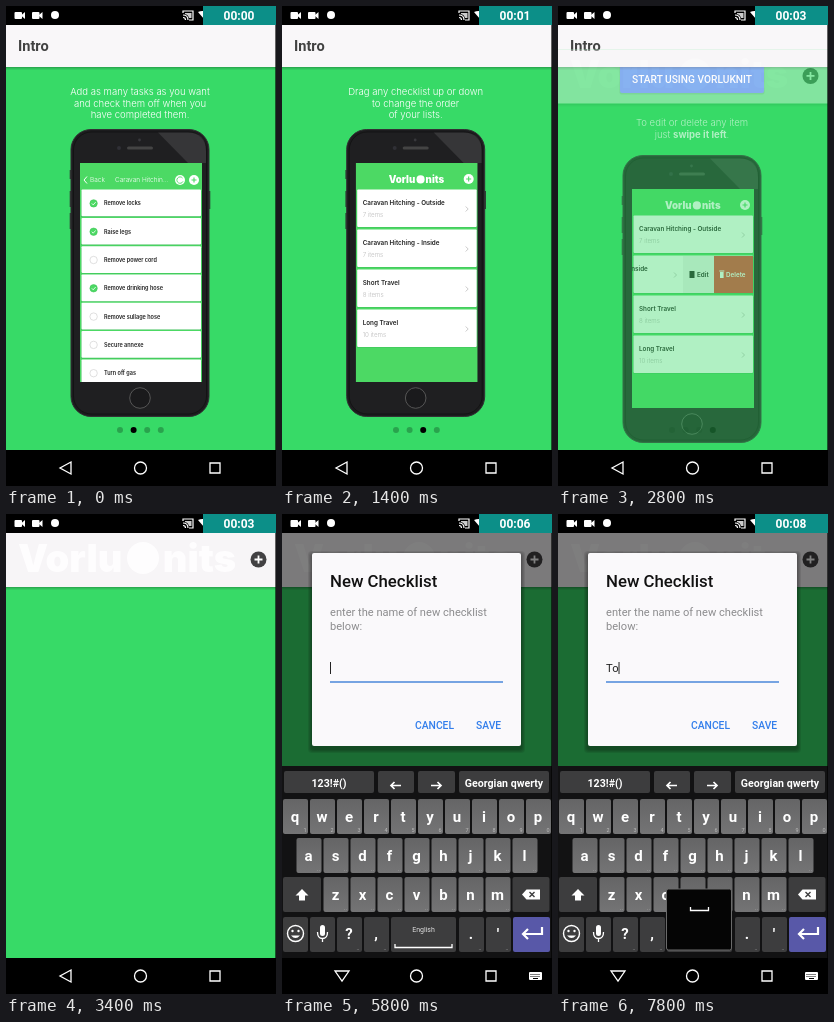
An HTML page that plays this animation: 270x480 px, repeating every 8 s.

```html
<!DOCTYPE html>
<html lang="en">
<head>
<meta charset="utf-8">
<title>Checklist app intro</title>
<style>
html, body { margin: 0; width: 100%; height: 100%; overflow: hidden; background: #000; }
svg { display: block; width: 100%; height: 100%; }
text { font-family: Roboto, sans-serif; white-space: pre; }
.mid { text-anchor: middle; }
.lead { font: 300 9.55px Inter, sans-serif; fill: #fff; text-anchor: middle; }
.lead tspan { font-weight: 700; }
.item { font: 600 5.5px Inter, sans-serif; fill: #222; }
.name { font: 600 6.3px Inter, sans-serif; fill: #222; }
.small { font: 300 6.2px Inter, sans-serif; fill: #bbb; }
.bar { font: 300 6.5px Inter, sans-serif; fill: #fff; }
.logo { font-family: Inter, sans-serif; font-weight: 900; }
.line { fill: none; stroke: #fff; stroke-width: 1.3; }
.key { font-weight: 700; font-size: 15px; fill: #fff; text-anchor: middle; }
.hint { font-size: 5.5px; fill: #bbb; text-anchor: end; }
.wide { font-weight: 700; font-size: 10.6px; fill: #fff; text-anchor: middle; }
.action { font-weight: 500; font-size: 10.3px; fill: #327eeb; }
</style>
</head>
<body>
<svg id="stage" viewBox="0 0 270 480"></svg>
<script>
const LOOP = 8000, GREEN = '#37da67', LIME = '#4cd964', DARK = '#3d3d3e';
const rect = (x, y, w, h, fill, more = '') =>
  `<rect x="${x}" y="${y}" width="${w}" height="${h}" fill="${fill}" ${more}/>`;
const disc = (x, y, r, fill, more = '') =>
  `<circle cx="${x}" cy="${y}" r="${r}" fill="${fill}" ${more}/>`;
const path = (d, more = 'class="line"') => `<path d="${d}" ${more}/>`;
const text = (x, y, str, cls, more = '') =>
  `<text x="${x}" y="${y}" class="${cls}" ${more}>${str}</text>`;
const group = (id, body, more = '') => `<g id="${id}" ${more}>${body}</g>`;
const shift = (x, y, body) => `<g transform="translate(${x} ${y})">${body}</g>`;
const plus = (x, y, r, back, front) => disc(x, y, r, back) +
  path(`M${x - r / 2} ${y}h${r}M${x} ${y - r / 2}v${r}`, `stroke="${front}" stroke-width="${r / 4.5}"`);
const chevron = (x, y) => path(`M${x} ${y - 2.5}l2.5 2.5l-2.5 2.5`, 'fill="none" stroke="#bbb" stroke-width=".8"');
const lead = (y, rows) => rows.map((r, i) => text(134, y + i * 11.6, r, 'lead')).join('');
const card = (y, h) => rect(11, y + .6, 120.5, h, '#3cc058', 'rx="1"') + rect(11.5, y - .4, 119.5, h + .4, '#fff', 'rx="1"');

// Phone parts use the phone's own top left corner as zero.
const phone = (y, screen) => shift(64, y,
  path('M.5 41v9M.5 62v16M.5 84v16M139.5 62v18', 'stroke="#2c4034" stroke-width="1.6"') +
  rect(1, .5, 138, 287, '#1c1c1e', 'rx="20" stroke="#323234"') +
  rect(3.5, 3, 133, 282, '#1f1f21', 'rx="18" stroke="#111" stroke-width=".7"') +
  path('M88 3.5h30q18 0 18 18v12.5h-18z', 'fill="#fff" opacity=".1"') +
  disc(69.5, 11, 1.4, '#38383c') + disc(49, 19, 2, '#303036') + rect(57, 17.5, 26, 3, '#444', 'rx="1.5"') +
  disc(70, 269, 10.3, '#1a1a1c', 'stroke="#555" stroke-width="1"') +
  `<svg x="10" y="34" width="122" height="219" viewBox="10 34 122 219">${rect(10, 34, 122, 219, LIME)}${screen}</svg>`);

const tasks = ['Remove locks', 'Raise legs', 'Remove power cord', 'Remove drinking hose',
  'Remove sullage hose', 'Secure annexe', 'Turn off gas'];
const taskScreen = path('M17 47.5l-3 3.5l3 3.5', 'class="line" style="stroke-width:1"') +
  text(20, 53.3, 'Back', 'bar') + text(45, 53.3, 'Caravan Hitchin...', 'bar') +
  disc(110, 51, 5, '#fff') + path('M112.5 49a3.2 3.2 0 1 0 .5 3.4', `fill="none" stroke="${LIME}" stroke-width=".9"`) +
  plus(124, 51, 5, '#fff', LIME) +
  tasks.map((name, i) => {
    const y = 61 + i * 28.3, done = i < 2 || i === 3;
    return card(y, 26.3) + disc(23.6, y + 13.4, 3.7, done ? LIME : '#fff', `stroke="${done ? '#42c75a' : '#ccc'}" stroke-width=".6"`) +
      (done ? path(`M21.8 ${y + 13.4}l1.4 1.5l2.5 -2.8`, 'class="line" style="stroke-width:.8"') : '') +
      text(34, y + 15.4, name, 'item');
  }).join('');

const logo = (x, y, size, fill) => {
  const k = size / 40;
  return shift(x, y, `<g transform="scale(${k})" fill="${fill}">` +
    text(0, 0, 'Vorlu', 'logo', 'font-size="38"') + disc(125, -14, 16, fill) +
    text(218, 0, 'nits', 'logo', 'font-size="38" text-anchor="end"') + '</g>');
};
const lists = [['Caravan Hitching - Outside', '7 items'], ['Caravan Hitching - Inside', '7 items'],
  ['Short Travel', '8 items'], ['Long Travel', '10 items']];
const listScreen = swiped => logo(43, 54, 10.2, '#fff') + plus(123, 50, 5, '#fff', LIME) +
  lists.map(([name, count], i) => {
    const y = 61 + i * 40, dx = swiped && i === 1 ? -68 : 0;
    return card(y, 37) + shift(dx, 0, text(17, y + 15, name, 'name') + text(17, y + 27, count, 'small') + chevron(120, y + 19)) +
      (dx ? rect(61, y, 31, 37, '#f1f1f1') + rect(92, y, 39, 37, '#e8403c') +
        rect(67.5, y + 15, 5, 7, '#222') + text(75, y + 21, 'Edit', 'name') +
        rect(98, y + 16, 3.6, 6, '#fff') + rect(97.3, y + 14.5, 5, 1, '#fff') +
        text(104, y + 21, 'Delete', 'name', 'style="fill:#fff"') : '');
  }).join('');

const slides = shift(0, 0, lead(89, ['Add as many tasks as you want', 'and check them off when you', 'have completed them.']) + phone(123, taskScreen)) +
  shift(270, 0, lead(89, ['Drag any checklist up or down', 'to change the order', 'of your lists.']) + phone(123, listScreen(false))) +
  shift(540, 0, rect(61.5, 53, 145, 35.5, '#1f9f48', 'rx="2" opacity=".4"') + rect(62, 52, 144, 35, '#3c82ea', 'rx="2"') +
    text(134, 76.5, 'START USING VORLUKNIT', 'mid', 'font-size="10.2" font-weight="500" fill="#fff"') +
    lead(120, ['To edit or delete any item', 'just <tspan>swipe it left</tspan>.']) + phone(149, listScreen(true)));

const shadow = y => [.22, .13, .06].map((o, i) => rect(0, y + i, 270, 1, '#000', `opacity="${o}"`)).join('');
const intro = rect(0, 19, 270, 425, GREEN) + group('slides', slides) +
  [0, 1, 2, 3].map(i => disc(114 + i * 13.6, 424, 3, '#000', 'class="dot"')).join('') +
  shadow(61) + rect(0, 19, 270, 42, '#f9f7f9') + text(12, 45, 'Intro', '', 'font-size="14.6" font-weight="600" fill="#424242"');

const home = rect(0, 19, 270, 425, GREEN) + shadow(73) + rect(0, 19, 270, 54, '#f7f5f7') +
  logo(12, 58, 40, '#fefdfe') + plus(252.5, 45.5, 8, '#424143', '#fff');

const dialog = [4, 3, 2, 1].map(i => rect(30 - i, 41 - i, 209 + 2 * i, 194 + 2 * i, '#000', 'rx="4" opacity=".09"')).join('') +
  rect(30, 39, 209, 193, '#faf9fb', 'rx="2"') +
  text(48, 72.5, 'New Checklist', '', 'font-size="16.8" font-weight="500" fill="#111"') +
  ['enter the name of new checklist', 'below:'].map((s, i) => text(48, 102 + i * 13.5, s, '', 'font-size="11.1" fill="#8c8c8e"')).join('') +
  text(48, 158, '', '', 'id="typed" font-size="11.2" fill="#222"') + rect(48, 148, 1, 12, '#222', 'id="caret"') +
  rect(48, 167.3, 173, 1.4, '#3f80d8') + text(133, 215, 'CANCEL', 'action') + text(194, 215, 'SAVE', 'action');

const keyBox = (x, y, w, h, fill, more = '') => rect(x, y, w, h, fill, `rx="2" ${more}`);
const letterRow = (chars, x, y, hints) => [...chars].map((c, i) =>
  keyBox(x + i * 27, y, 25, 35, 'url(#cap)') + text(x + i * 27 + 12, y + 22.5, c, 'key letter') +
  text(x + i * 27 + 23.5, y + 33, hints[i] || '..', 'hint')).join('');
const space = (x, y, w) => path(`M${x} ${y}v3.5h${w}v-3.5`);
const keyboard = rect(0, 252, 270, 192, '#121213') +
  [[2, 90, '123!#()'], [96, 36, ''], [136, 37, ''], [177, 90, 'Georgian qwerty']].map(([x, w, s]) =>
    keyBox(x, 257, w, 22, DARK) + text(x + w / 2, 273, s, 'wide')).join('') +
  path('M119 271.5h-10m3.5-3.5l-3.5 3.5l3.5 3.5M149 271.5h10m-3.5-3.5l3.5 3.5l-3.5 3.5', 'class="line" style="stroke-width:1.7"') +
  letterRow('qwertyuiop', 1, 285, '1234567890') + letterRow('asdfghjkl', 14.5, 324, []) + letterRow('zxcvbnm', 41.5, 363, []) +
  keyBox(1, 363, 38, 35, DARK, 'id="shiftKey"') + path('M20 375l-6.5 6.5h3.5v5h6v-5h3.5z', 'fill="#fff"') +
  keyBox(230.5, 363, 37, 35, DARK) + path('M240 380.5l4.5-5h13.5v10h-13.5z', 'fill="#fff"') +
  path('M247.5 378l5 5m0-5l-5 5', `stroke="${DARK}" stroke-width="1.4"`) +
  [1, 28, 55, 82, 177, 204].map(x => keyBox(x, 403, 25, 35, DARK)).join('') +
  disc(13.5, 419.5, 8, 'none', 'stroke="#fff" stroke-width="1.4"') + disc(10.5, 417, 1.2, '#fff') + disc(16.5, 417, 1.2, '#fff') +
  path('M9 421.5q4.5 5 9 0z', 'fill="#fff"') +
  rect(38, 411, 5, 11, '#fff', 'rx="2.5"') + path('M35.5 418q0 6.5 5 6.5t5-6.5M40.5 424v4') +
  ['?', ',', '.', "'"].map((c, i) => text([67, 94, 189, 216][i], 425, c, 'key')).join('') +
  [79, 106, 201, 228].map(x => text(x - 1.5, 435.5, '..', 'hint')).join('') +
  keyBox(109, 403, 65, 35, DARK) + text(141.5, 418, 'English', 'mid', 'font-size="7" fill="#ddd"') + space(113, 430, 57) +
  keyBox(231, 403, 37, 35, '#5858a8') + path('M260 413v7h-19m5-5l-5 5l5 5', 'class="line" style="stroke-width:2.2"') +
  group('popup', '');

const camera = x => rect(x, 6, 7.5, 7, '#fff', 'rx="1"') + path(`M${x + 7} 9l3.5-3v7l-3.5-3z`, 'fill="#fff"');
const frame = rect(0, 0, 270, 19, '#000') + camera(8.5) + camera(26) + disc(49, 9, 4, '#fff') +
  path('M177 7v-2h10v9h-4M177 9q5 0 5 5M177 11.5q2.5 0 2.5 2.5', 'class="line" style="stroke-width:1.2"') +
  path('M179 7h6.5v5h-2.5q-1-3.5-4-4z', 'fill="#fff" opacity=".8"') +
  path('M192 6q3-1.5 6-1v8z', 'fill="#fff"') +
  rect(197, 0, 73, 19, '#0c8f88') + text(233, 14, '', 'mid', 'id="clock" font-size="12" font-weight="700" fill="#fff"') +
  rect(269, 19, 1, 425, '#000', 'opacity=".6"') + rect(0, 444, 270, 36, '#000') +
  path('M65 456v12l-11-6z', 'id="back" class="line"') + disc(134.5, 462, 6, 'none', 'stroke="#fff" stroke-width="1.3"') +
  path('M204 457h10v10h-10z') +
  group('imeIcon', rect(247, 458, 13, 8, '#fff', 'rx="1"') +
    path('M248.5 460.5h10M248.5 462.5h10', 'stroke="#000" stroke-dasharray="1 1"') + rect(251, 464, 5, 1, '#000'));

const stage = document.getElementById('stage');
stage.innerHTML = `<defs><linearGradient id="cap" x2="0" y2="1"><stop stop-color="#656566"/><stop offset="1" stop-color="#747475"/></linearGradient></defs>` +
  rect(0, 0, 270, 480, '#000') + group('intro', intro) + group('home', home) + rect(0, 19, 270, 425, '#000', 'id="shade"') +
  group('dialog', dialog) + group('keyboard', keyboard) + frame;

const $ = id => document.getElementById(id);
const set = (id, name, value) => $(id).setAttribute(name, value);
const show = (id, on) => set(id, 'visibility', on ? 'visible' : 'hidden');
const dots = [...stage.querySelectorAll('.dot')];
const letters = [...stage.querySelectorAll('.letter')];
const easeOut = (t, from, ms) => 1 - (1 - Math.min(1, Math.max(0, (t - from) / ms))) ** 2;

const swipe = [[0, 0], [600, 0], [800, -64], [900, -130], [1000, -222], [1100, -258], [1200, -270],
  [1400, -270], [1600, -334], [1700, -400], [1800, -486], [1900, -519], [2000, -531], [2150, -540], [LOOP, -540]];
const typing = [[0, ''], [7150, 'T'], [7550, 'To']];
const presses = [[7000, 7150, 'T', 109, 25, 257], [7380, 7550, 'o', 217, 25, 257], [7750, LOOP, ' ', 109, 65, 375]];

function along(points, t) {
  const i = points.findIndex(p => p[0] > t), [a, u] = points[i - 1], [b, v] = points[i];
  return u + (v - u) * (t - a) / (b - a);
}
function popup(press) {
  if (!press) return '';
  const [, , char, x, w, y] = press, mid = x + w / 2;
  return rect(x - .5, y, w, 61, '#050505', 'rx="2" stroke="#6a6a6a"') +
    (char === ' ' ? space(mid - 9, y + 18, 18) : text(mid, y + 24, char, 'key'));
}

function draw(t) {
  set('slides', 'transform', `translate(${along(swipe, t)} 0)`);
  const active = 1 + (t >= 900) + (t >= 1720);
  dots.forEach((d, i) => d.setAttribute('opacity', i === active ? 1 : .25));

  const enter = easeOut(t, 2740, 280);
  set('home', 'opacity', enter);
  set('home', 'transform', `translate(0 ${40 * (1 - enter)})`);

  const open = easeOut(t, 5194, 280), typingOpen = t >= 5500;
  set('shade', 'opacity', .5 * open);
  set('dialog', 'opacity', open);
  const size = .9 + .1 * open;
  set('dialog', 'transform', `translate(134.5 ${typingOpen ? 135.5 : 231.5}) scale(${size}) translate(-134.5 -135.5)`);

  const rise = easeOut(t, 5500, 160);
  show('keyboard', typingOpen);
  set('keyboard', 'transform', `translate(0 ${192 * (1 - rise)})`);
  show('imeIcon', typingOpen);
  set('back', 'd', typingOpen ? 'M53 457h14l-7 10z' : 'M65 456v12l-11-6z');

  const upper = t >= 6680 && t < 7150;
  letters.forEach(l => { l.textContent = upper ? l.textContent.toUpperCase() : l.textContent.toLowerCase(); });
  set('shiftKey', 'fill', t >= 6550 && t < 7150 ? '#77777a' : DARK);
  $('popup').innerHTML = popup(presses.find(p => t >= p[0] && t < p[1]));

  $('typed').textContent = typing.filter(p => p[0] <= t).pop()[1];
  set('caret', 'x', 48 + $('typed').getComputedTextLength());
  show('caret', t < 6100 || t >= 6600);
  $('clock').textContent = '00:0' + Math.floor((t + 300) / 1000);
}

const start = performance.now();
function tick() {
  draw((performance.now() - start) % LOOP);
  requestAnimationFrame(tick);
}
tick();
</script>
</body>
</html>
```
